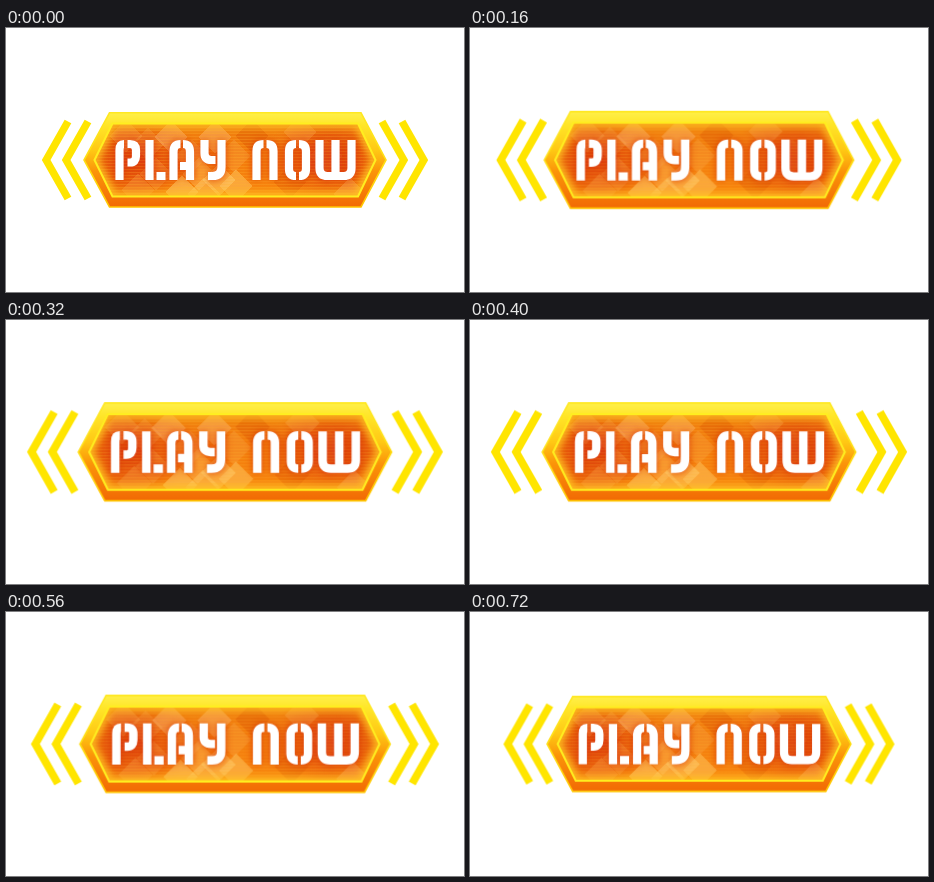
An HTML page that plays this animation: 458x264 px, repeating every 760 ms.

```html
<!DOCTYPE html>
<html lang="en">
<head>
<meta charset="utf-8">
<title>Play now</title>
<style>
html, body { margin: 0; width: 100%; height: 100%; overflow: hidden; background: #fff; }
svg { display: block; width: 458px; height: 264px; }
.move { transform-box: view-box; transform-origin: 229px 132px; }
.chevron { fill: none; stroke: #ffe500; stroke-width: 7.6; stroke-miterlimit: 8; }
.letters { fill: none; stroke: #fff; stroke-width: 8.2; }
.glow { stroke: #d8350a; stroke-width: 11; opacity: .6; }
</style>
</head>
<body>
<svg viewBox="0 0 458 264" role="img" aria-label="PLAY NOW">
  <defs>
    <linearGradient id="frame" x1="0" y1="0" x2="0" y2="1">
      <stop offset="0" stop-color="#fff04a"/>
      <stop offset=".13" stop-color="#ffe629"/>
      <stop offset=".4" stop-color="#ffc814"/>
      <stop offset=".62" stop-color="#fb9409"/>
      <stop offset="1" stop-color="#f26a05"/>
    </linearGradient>
    <linearGradient id="rim" x1="0" y1="0" x2="0" y2="1">
      <stop offset="0" stop-color="#ffe822"/>
      <stop offset=".6" stop-color="#ffdc10"/>
      <stop offset="1" stop-color="#ffc400"/>
    </linearGradient>
    <linearGradient id="panel" x1="0" y1="0" x2="0" y2="1">
      <stop offset="0" stop-color="#f08412"/>
      <stop offset=".4" stop-color="#f27a0c"/>
      <stop offset="1" stop-color="#fa8a10"/>
    </linearGradient>
    <radialGradient id="ember">
      <stop offset="0" stop-color="#d8300c" stop-opacity=".85"/>
      <stop offset=".5" stop-color="#dc3c0a" stop-opacity=".5"/>
      <stop offset="1" stop-color="#e04a08" stop-opacity="0"/>
    </radialGradient>
    <pattern id="scan" width="4" height="3" patternUnits="userSpaceOnUse">
      <rect width="4" height="1" fill="#ffb030" opacity=".28"/>
    </pattern>
    <path id="hex" d="M106.500 95.500H352L369.500 132 352 168.500H106.500L88.500 132Z"/>
    <clipPath id="inside"><use href="#hex"/></clipPath>
    <filter id="soft" x="-20%" y="-40%" width="140%" height="180%"><feGaussianBlur stdDeviation="3"/></filter>
    <path id="words" d="M113.500 152V122Q113.500 116 118 116M121.500 116H124Q130 116 130 122V128Q130 134.500 124 134.500H121.500
      M143.500 112V152M150.500 148H159.500
      M167.500 152V124Q167.500 116 174.500 116M177 116Q184 116 184 124V152M174 138H181
      M198.500 112V125Q198.500 132 205.500 132H209.500M215.500 112V139Q215.500 148 206.500 148H202
      M250.500 152V123Q250.500 116 257.500 116M260.500 116Q267.500 116 267.500 123V152
      M290 116Q283 116 283 123V141Q283 148 290 148M293 116Q300 116 300 123V141Q300 148 293 148
      M313.500 112V140Q313.500 148 321.500 148H325.500M329.500 112V152M333.500 148H337.500Q345.500 148 345.500 140V112"/>
  </defs>

  <g class="move" id="button">
    <path d="M103.500 84.800H355L380 132 355 179H103.500L78 132Z" fill="url(#frame)" stroke="url(#rim)" stroke-width="1.6"/>
    <g clip-path="url(#inside)">
      <path d="M80 90H380V174H80Z" fill="url(#panel)"/>
      <ellipse cx="128" cy="132" rx="62" ry="46" fill="url(#ember)"/>
      <ellipse cx="324" cy="130" rx="66" ry="46" fill="url(#ember)"/>
      <g id="tiles"></g>
      <path d="M80 90H380V174H80Z" fill="url(#scan)"/>
      <use href="#hex" fill="none" stroke="#ffc420" stroke-width="9" opacity=".8" filter="url(#soft)"/>
    </g>
    <use href="#words" class="letters glow" filter="url(#soft)"/>
    <use href="#hex" fill="none" stroke="#ffee20" stroke-width="2"/>
    <use href="#words" class="letters"/>
  </g>

  <g class="move chevron" id="left">
    <path id="pair" d="M62 93.500L40.200 132 62 170.500M82 93.500L60.200 132 82 170.500"/>
  </g>
  <g class="move chevron" id="right">
    <use href="#pair" transform="translate(458 0) scale(-1 1)"/>
  </g>
</svg>
<script>
const LOOP = 760, STEP = 40, PEAK = 370;
const $ = id => document.getElementById(id);

// x, y, opacity, colour of each diamond on the panel
const tiles = [
  [120, 108, .25, '#ffc070'], [142, 116, .2, '#ffc070'], [165, 109, .38, '#ffc888'],
  [186, 128, .25, '#ffc070'], [209, 109, .38, '#ffc888'], [246, 108, .35, '#d84e00'],
  [228, 128, .2, '#ffc070'], [294, 104, .25, '#ffc070'], [150, 146, .25, '#ffb860'],
  [193, 146, .35, '#ffc870'], [213, 152, .5, '#ffd070'], [176, 164, .55, '#ffd070'],
  [198, 166, .45, '#ffd070'], [230, 158, .45, '#ffd070'], [132, 162, .25, '#ffb860'],
  [284, 154, .3, '#d84e00'], [320, 128, .12, '#ffc070'], [344, 166, .35, '#ffc070']
];
$('tiles').innerHTML = tiles.map(([x, y, o, c]) =>
  `<path d="M${x} ${y - 16}l16 16-16 16-16-16z" fill="${c}" stroke="${c}" opacity="${o}"/>`).join('');

// 0 to 1 at the peak, then back to 0 at the end of the loop
const swell = t => t < PEAK
  ? Math.sin(Math.PI / 2 * t / PEAK)
  : Math.cos(Math.PI / 2 * (t - PEAK) / (LOOP - PEAK));

function pulse(el, shift) {
  const frames = [];
  for (let t = 0; t <= LOOP; t += STEP) {
    const k = swell(t);
    frames.push({
      offset: t / LOOP,
      easing: 'steps(1, end)',
      transform: `translateX(${shift * k}px) scale(${1 + .038 * k})`
    });
  }
  el.animate(frames, { duration: LOOP, iterations: Infinity });
}

pulse($('button'), 0);
pulse($('left'), -7.8);
pulse($('right'), 7.8);
</script>
</body>
</html>
```
